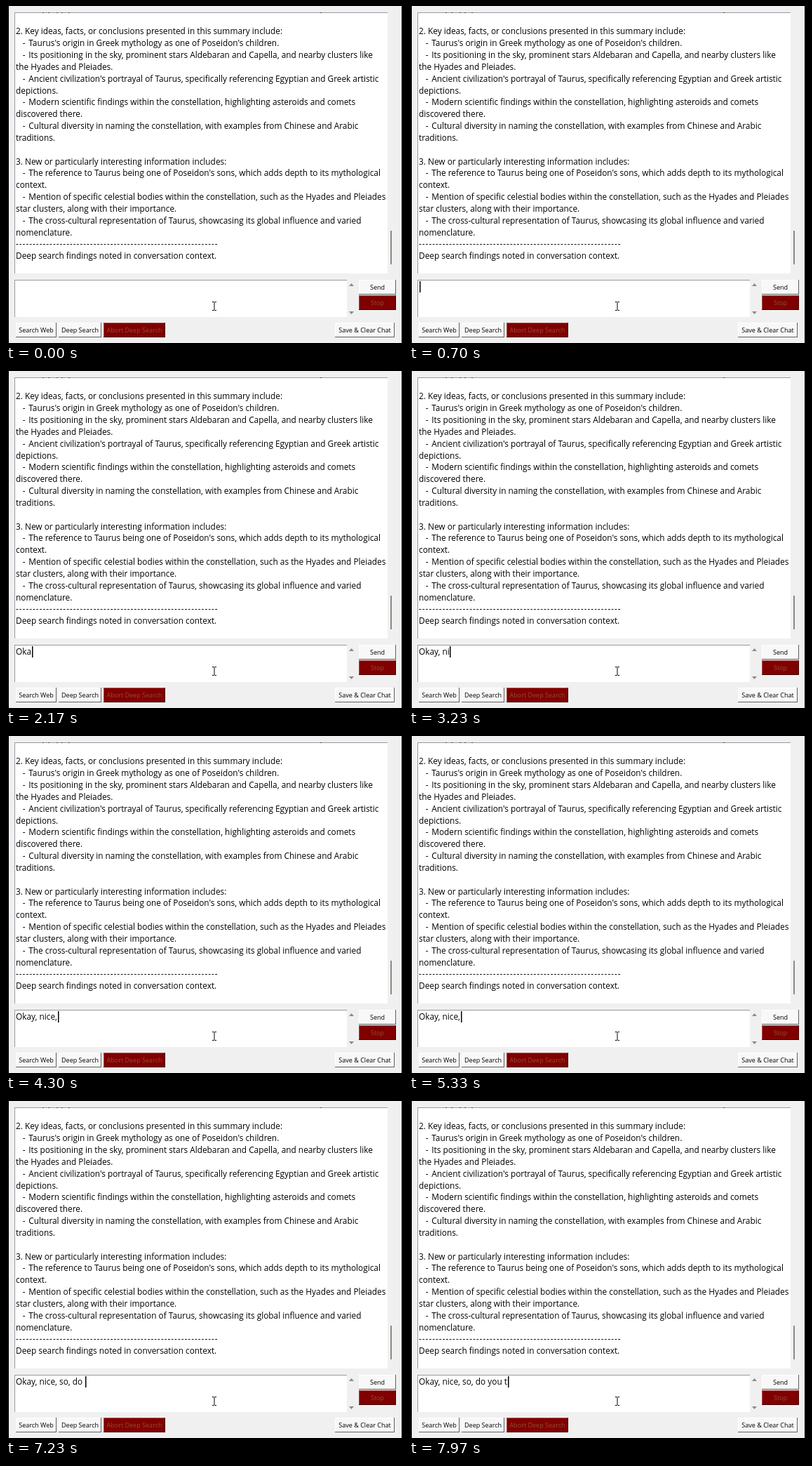
These frames come from a looping animation (566x480 px, 8 s). An HTML page with a canvas:

```html
<!DOCTYPE html>
<html lang="en">
<head>
<meta charset="utf-8">
<title>Chat window</title>
<style>
html, body { margin: 0; width: 566px; height: 480px; overflow: hidden; background: #000; }
canvas { display: block; }
</style>
</head>
<body>
<canvas id="stage" width="566" height="480"></canvas>
<script>
const ctx = document.getElementById('stage').getContext('2d');
const LOOP = 8000, LINE_HEIGHT = 16.84;
const INK = '#000', PAPER = '#fff', PANEL = '#f0f0f0', EDGE = '#9898a4';
const BODY_FONT = '11.85px "Open Sans", sans-serif';
const BUTTON_FONT = '9.05px "Open Sans", sans-serif';

const lines = [
  '2. Key ideas, facts, or conclusions presented in this summary include:',
  "- Taurus's origin in Greek mythology as one of Poseidon's children.",
  '- Its positioning in the sky, prominent stars Aldebaran and Capella, and nearby clusters like',
  'the Hyades and Pleiades.',
  "- Ancient civilization's portrayal of Taurus, specifically referencing Egyptian and Greek artistic",
  'depictions.',
  '- Modern scientific findings within the constellation, highlighting asteroids and comets',
  'discovered there.',
  '- Cultural diversity in naming the constellation, with examples from Chinese and Arabic',
  'traditions.',
  '',
  '3. New or particularly interesting information includes:',
  "- The reference to Taurus being one of Poseidon's sons, which adds depth to its mythological",
  'context.',
  '- Mention of specific celestial bodies within the constellation, such as the Hyades and Pleiades',
  'star clusters, along with their importance.',
  '- The cross-cultural representation of Taurus, showcasing its global influence and varied',
  'nomenclature.',
  '-'.repeat(60),
  'Deep search findings noted in conversation context.'
];

// Each burst: text, time of its first key, time between keys
const bursts = [
  ['Oka', 1750, 170],
  ['y, nice,', 2300, 228],
  [' so,', 5420, 153],
  [' do you t', 6780, 140]
];
const keys = bursts.flatMap(([text, start, step]) =>
  [...text].map((char, i) => ({ char, at: start + i * step })));

function rect(x, y, w, h, color) {
  ctx.fillStyle = color;
  ctx.fillRect(x, y, w, h);
}

function write(text, x, y, color = INK) {
  ctx.fillStyle = color;
  ctx.fillText(text, x, y);
}

function field(x, y, w, h) {
  rect(x, y, w, h, PAPER);
  rect(x, y, w, 1, EDGE);
  rect(x, y, 1, h, EDGE);
}

function button(label, x, y, w, dark) {
  rect(x, y, w, 21, dark ? '#400000' : '#606060');
  rect(x, y, w - 1, 20, dark ? '#a85050' : '#fff');
  rect(x + 1, y + 1, w - 2, 19, dark ? '#800000' : '#f8f8f8');
  ctx.font = BUTTON_FONT;
  ctx.textAlign = 'center';
  write(label, x + w / 2, y + 13.7, dark ? '#904c38' : INK);
  ctx.textAlign = 'left';
}

function arrow(x, y, dir) {
  ctx.fillStyle = '#8a8a8a';
  ctx.beginPath();
  ctx.moveTo(x - 3.5, y + 2 * dir);
  ctx.lineTo(x + 3.5, y + 2 * dir);
  ctx.lineTo(x, y - 2 * dir);
  ctx.fill();
}

function transcript() {
  field(12, 9, 532, 372);
  // Descenders of the line scrolled out at the top
  for (const x of [52, 60, 72, 79, 89, 448]) rect(x, 9, 2, 1, '#444');
  ctx.font = BODY_FONT;
  lines.forEach((line, i) => {
    const y = Math.round(40.3 + i * LINE_HEIGHT);
    if (line.startsWith('- ')) {
      write('-', 23.7, y);
      write(line.slice(2), 32.2, y);
    } else {
      ctx.letterSpacing = line.startsWith('--') ? '1px' : '0px';
      write(line, 14, y);
      ctx.letterSpacing = '0px';
    }
  });
  rect(548, 320, 2, 48, '#8c8c84');
}

function pointer() {
  rect(296.5, 422, 1, 11, INK);
  for (const y of [421, 433]) {
    rect(294, y, 2.5, 1, INK);
    rect(297.5, y, 2.5, 1, INK);
  }
}

// The caret shows for 600 ms, hides for 300 ms, and restarts on every key
function caretVisible(t, lastKey) {
  const since = t - (lastKey ?? 300);
  return since >= 0 && since % 900 < 600;
}

function inputBox(t) {
  field(12, 390, 474, 53);
  const typed = keys.filter(key => key.at <= t);
  const text = typed.map(key => key.char).join('');
  ctx.font = BODY_FONT;
  write(text, 14, 404);
  if (caretVisible(t, typed.at(-1)?.at)) {
    rect(Math.round(14.6 + ctx.measureText(text).width), 392, 1.5, 16, INK);
  }
  arrow(492.5, 397, 1);
  arrow(492.5, 437, -1);
}

function draw(now) {
  const t = now % LOOP;
  rect(0, 0, 566, 480, '#000');
  rect(4, 0, 560, 480, PANEL);
  transcript();
  inputBox(t);
  button('Send', 503, 390, 53);
  button('Stop', 503, 412, 53, true);
  button('Search Web', 14, 451, 58);
  button('Deep Search', 75, 451, 61);
  button('Abort Deep Search', 139, 451, 88, true);
  button('Save & Clear Chat', 469, 451, 85);
  pointer();
}

let start;
function tick(now) {
  start ??= now;
  draw(now - start);
  requestAnimationFrame(tick);
}
draw(0);
requestAnimationFrame(tick);
</script>
</body>
</html>
```
